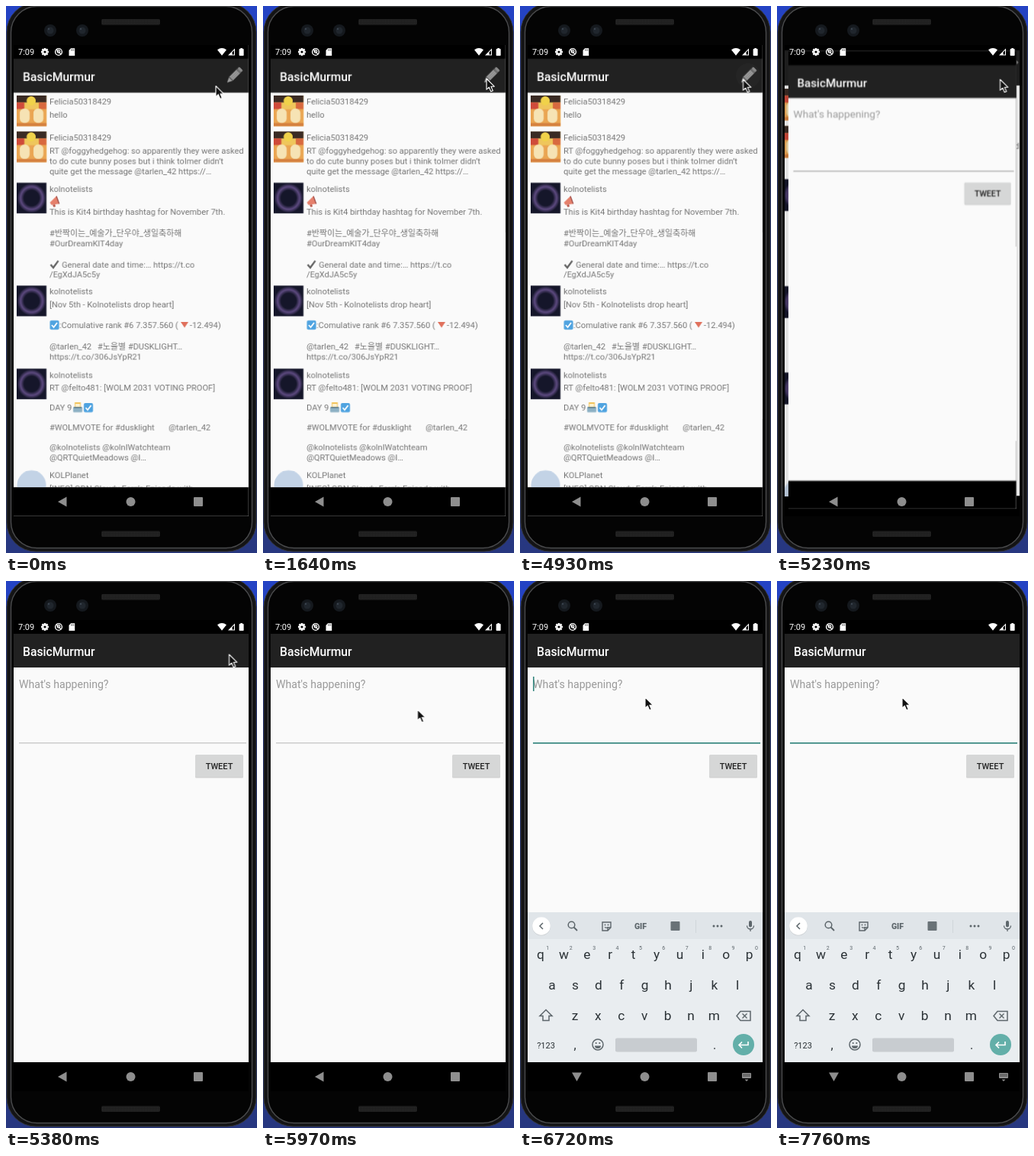
An HTML page for the animation above (8000 ms loop, 329x715 px).

```html
<!DOCTYPE html>
<html lang="en">
<head>
<meta charset="utf-8">
<style>
  html, body { margin: 0; width: 100%; height: 100%; overflow: hidden; background: #2440b8; }
  svg { display: block; width: 329px; height: 715px; }
  text { font-family: Roboto, 'Noto Sans CJK KR', 'Noto Sans CJK JP', sans-serif; white-space: pre; }
</style>
</head>
<body>
<script>
const LOOP = 8000;
const GREY = '#757575';

const rect = (x, y, w, h, fill, extra = '') =>
  `<rect x="${x}" y="${y}" width="${w}" height="${h}" fill="${fill}" ${extra}/>`;
const circle = (x, y, r, fill, extra = '') =>
  `<circle cx="${x}" cy="${y}" r="${r}" fill="${fill}" ${extra}/>`;
const path = (d, fill, extra = '') => `<path d="${d}" fill="${fill}" ${extra}/>`;
const line = (d, color, width = 1.5) => path(d, 'none', `stroke="${color}" stroke-width="${width}"`);
const text = (x, y, str, size = 11, fill = GREY, extra = '') =>
  `<text x="${x}" y="${y}" font-size="${size}" fill="${fill}" ${extra}>${str}</text>`;
const centered = (x, y, str, size, fill, extra = '') =>
  text(x, y, str, size, fill, `text-anchor="middle" ${extra}`);
const group = (content, attrs = '') => `<g ${attrs}>${content}</g>`;
const at = (x, y, content) => group(content, `transform="translate(${x} ${y})"`);

// Phone body
const speaker = y => rect(125, y, 77, 8, '#1b1b1b', 'rx="2"') + rect(126, y + 1, 75, 6, 'url(#mesh)');
const camera = x => circle(x, 32, 8, '#15191e') + circle(x, 32, 4.5, '#20262d') + circle(x - 2, 30, 1.2, '#3a424c');
const phone =
  rect(0, 0, 329, 715, 'url(#desk)') +
  rect(1, -4, 327, 717, '#141415', 'rx="38" stroke="#333436"') +
  rect(6.5, .5, 316, 708, '#040404', 'rx="34" stroke="#4a4b4d" stroke-width="1.4"') +
  camera(58) + camera(100) + speaker(17) + speaker(686);

// Status and navigation bars
const gearTeeth = [0, 45, 90, 135].map(a => rect(-1.2, -5, 2.4, 10, '#fff', `transform="rotate(${a})"`)).join('');
const status =
  text(16, 64, '7:09', 11, '#fff') +
  at(51, 60, gearTeeth + circle(0, 0, 3.7, '#fff') + circle(0, 0, 1.6, '#000')) +
  at(69, 60, circle(0, 0, 4.4, 'none', 'stroke="#fff" stroke-width="1.4"') +
    circle(0, -.6, 1.8, 'none', 'stroke="#fff" stroke-width="1.2"') + line('M-3 -3L3 3', '#fff', 1.1)) +
  path('M82.5 58L85 55.2H90.2V65H82.5Z', '#fff') + line('M85.6 56.5v2M87.2 56.5v2M88.8 56.5v2', '#000', .6) +
  path('M277 57.2Q283 52.8 289 57.2L283 64.8Z', '#fff') +
  path('M291 64.5L300 55.5V64.5Z', '#fff') + path('M296.5 60.5L299 58V63.5H296.5Z', '#000') +
  rect(305.6, 56, 6, 9, '#fff', 'rx=".8"') + rect(307.3, 55, 2.6, 2, '#fff');

const keyboardGlyph = rect(291, 643, 12, 7, '#8e8e8e', 'rx="1"') +
  [645, 647].map(y => line(`M292.5 ${y}h9`, '#000', 1.1).replace('/>', ' stroke-dasharray="1 1"/>')).join('') +
  path('M294.5 651.5h5l-2.5 2.5Z', '#8e8e8e');
const nav =
  circle(163.5, 648, 6, '#8e8e8e') + rect(246, 642, 12, 12, '#8e8e8e', 'rx="1"') +
  group(path('M68 648L79.5 641.5V654.5Z', '#8e8e8e'), 'id="back"') +
  group(path('M68 642.5H81L74.5 654Z', '#8e8e8e') + keyboardGlyph, 'id="hide"');

const appBar = rect(10, 51, 308, 18, '#000') + rect(10, 69, 308, 44, '#212121') +
  text(22, 98, 'BasicMurmur', 15.7, '#fff', 'font-weight="500"');

// Timeline
const photo = y => at(14, y,
  rect(0, 0, 39, 40, '#efc65c') + rect(0, 0, 39, 9, '#3a2b24') + circle(19, 7, 6, '#f0d24a') +
  rect(0, 9, 10, 9, '#cf4a3a') + rect(29, 9, 10, 9, '#d8693f') + rect(0, 18, 39, 22, '#eaa552') +
  rect(4, 17, 13, 19, '#f6e3b4', 'rx="6"') + rect(22, 17, 13, 19, '#f6e3b4', 'rx="6"') +
  rect(0, 36, 39, 4, '#d5803f'));
const badge = y => rect(14, y, 39, 40, 'url(#glow)');

const checkBox = (x, y) => at(x, y, rect(0, 0, 12, 12, '#4fa3e0', 'rx="2"') + line('M2.5 6L5 9L9.5 3', '#fff', 1.7));
const ballot = at(87, 518, rect(1, 6, 12, 7, '#8db1c4', 'rx="1"') + rect(3, 0, 8, 7, '#f1c35a') +
  rect(4, 2, 6, 4, '#fff3d2') + rect(2, 6, 10, 1.5, '#55788c'));
const megaphone = path('M57.5 257L66 248.5L69.5 258.5L59.5 260Z', '#e5806c') +
  path('M61 260l1.5 3l2.5-.8l-.8-2.8Z', '#b9574a') + line('M66 248.5L69.7 258.5', '#9c4a45', 1.3);

const posts = [
  [57, 129, 'Felicia50318429'], [57, 146, 'hello'],
  [57, 176, 'Felicia50318429'],
  [57, 193, 'RT @foggyhedgehog: so apparently they were asked'],
  [57, 206.5, 'to do cute bunny poses but i think tolmer didn’t'],
  [57, 219.5, 'quite get the message @tarlen_42 https://…'],
  [57, 243, 'kolnotelists'],
  [57, 272.5, 'This is Kit4 birthday hashtag for November 7th.'],
  [57, 301, '#반짝이는_예술가_단우야_생일축하해'],
  [57, 314.5, '#OurDreamKIT4day'],
  [73, 342, 'General date and time:… https://t.co'],
  [57, 355, '/EgXdJA5c5y'],
  [57, 377, 'kolnotelists'],
  [57, 394, '[Nov 5th - Kolnotelists drop heart]'],
  [70, 420.5, ':Comulative rank #6 7.357.560 ('], [241, 420.5, '-12.494)'],
  [57, 448.5, '@tarlen_42'], [120, 448.5, '#노을별 #DUSKLIGHT…'],
  [57, 462, 'https://t.co/306JsYpR21'],
  [57, 486, 'kolnotelists'],
  [57, 502.5, 'RT @felto481: [WOLM 2031 VOTING PROOF]'],
  [57, 529, 'DAY 9'],
  [57, 555, '#WOLMVOTE for #dusklight'], [213, 555, '@tarlen_42'],
  [57, 581, '@kolnotelists @kolnlWatchteam'],
  [57, 594, '@QRTQuietMeadows @I…'],
  [57, 617.5, 'KOLPlanet'],
  [57, 634, '[INFO] QDN Cloudy Fern’s Episode with']
];

const pencil = group(
  path('M-3.4 -9.5V6L0 13L3.4 6V-9.5Z', '#9d9d9d') + rect(-3.4, -13, 6.8, 3.6, '#8a8a8a', 'rx="1.2"') +
  line('M-3.4 -8.2H3.4M-3.4 6H3.4', '#3a3a3a', 1) + line('M-1 -8V6M1.4 -8V6', '#777', .6),
  'transform="translate(299 91) rotate(45)"');

const feed = group(
  rect(10, 51, 308, 616, '#000') + rect(10, 113, 308, 516, '#fafafa') + appBar +
  circle(299, 91, 16, '#fff', 'id="ripple" opacity="0"') + pencil +
  group(
    photo(117) + photo(164) + badge(231) + badge(365.5) + badge(474) + circle(33.5, 626, 19, '#c3d3e6') +
    megaphone + line('M58.5 338L62 342L68.5 333', '#666', 2.4) + checkBox(57.5, 411) +
    path('M229 413h10l-5 7.5Z', '#e0705c') + ballot + checkBox(102, 519) +
    posts.map(p => text(...p)).join(''),
    'clip-path="url(#listArea)"'),
  'id="feed"');

// Compose screen
const compose = group(
  rect(10, 51, 308, 616, '#000') + rect(10, 113, 308, 516, '#fafafa') + appBar +
  rect(10, 113, 308, 2, '#000', 'opacity=".06"') +
  text(17, 140, 'What\'s happening?', 14.1, '#9a9a9a') +
  rect(17, 211.3, 298, 1, '#8c8c8c', 'id="rule"') +
  rect(17, 211, 298, 1.7, '#35877f', 'id="focus"') +
  rect(17, 125, 1.6, 19, '#35877f', 'id="caret"') +
  rect(248, 228, 63, 29.5, '#000', 'rx="1.5" opacity=".16"') + rect(248, 227, 63, 29, '#d6d7d7', 'rx="1.5"') +
  centered(279.5, 246, 'TWEET', 11, '#222', 'font-weight="500"'),
  'id="compose"');

// Keyboard
const INK = '#2b3236', ICON = '#5d666b', PITCH = 30.4;
const keyRow = (keys, x, y) => [...keys].map((k, i) => centered(x + i * PITCH, y, k, 17.3, INK)).join('');
const keyboard = group(
  rect(10, 433, 308, 35, '#e0e5e9') + rect(10, 468, 308, 161, '#e9edf0') +
  circle(28, 451.5, 12, '#000', 'opacity=".1"') + circle(28, 451, 11.8, '#fff') +
  line('M30 447L26 451L30 455', ICON) +
  circle(67.5, 449.5, 4.3, 'none', `stroke="${ICON}" stroke-width="1.5"`) + line('M70.5 452.5L75 457', ICON, 1.8) +
  path('M108 446h11v7l-4 4h-7ZM115 457v-4h4', 'none', `stroke="${ICON}" stroke-width="1.4"`) +
  circle(111.5, 449.5, .9, ICON) + circle(115.5, 449.5, .9, ICON) + line('M111 452.5q2.4 1.8 4.5 0', ICON, 1.1) +
  centered(158, 454.5, 'GIF', 10.5, ICON, 'font-weight="900"') +
  rect(197.5, 445, 12, 12, '#697277', 'rx="1"') +
  rect(230, 443, 1, 17, '#d0d6da') +
  [254, 259, 264].map(x => circle(x, 451, 1.5, ICON)).join('') +
  rect(300, 444, 4, 8.5, ICON, 'rx="2"') + line('M297.5 450.5a4.5 4.5 0 0 0 9 0M302 455v3', ICON, 1.3) +
  keyRow('qwertyuiop', 27, 494) +
  [...'1234567890'].map((n, i) => centered(36.3 + i * PITCH, 481.5, n, 7, ICON)).join('') +
  keyRow('asdfghjkl', 42, 533.5) + keyRow('zxcvbnm', 72, 573.5) +
  path('M34 560.5L42 568.5H38V574.5H30V568.5H26Z', 'none', `stroke="${ICON}" stroke-width="1.5"`) +
  path('M289 562.5H302V574.5H289L284 568.5Z', 'none', `stroke="${ICON}" stroke-width="1.5"`) +
  line('M291.5 565.5l6 6M297.5 565.5l-6 6', ICON, 1.4) +
  centered(34, 610.5, '?123', 11, INK) + centered(72, 612, ',', 16, INK) + centered(255, 612, '.', 16, INK) +
  circle(102, 606, 7, 'none', `stroke="${ICON}" stroke-width="1.5"`) +
  circle(99.7, 604, 1.1, ICON) + circle(104.3, 604, 1.1, ICON) + path('M98 607.5h8a4 3.5 0 0 1-8 0Z', ICON) +
  rect(125, 597.5, 107, 18, '#c8ccd0', 'rx="2"') +
  circle(293, 606, 14, '#63afa9') + line('M299 602V606.5H287.5M291 602.5L287 606.5L291 610.5', '#fff', 1.6),
  'id="keyboard"');

const pointer = group(
  path('M0 0V14.2L3.3 11.2L5.7 16.8L8.3 15.7L5.9 10.2H10.2Z', '#111', 'stroke="#fff" stroke-width="1.1" stroke-linejoin="round"'),
  'id="pointer"');

const defs = `<defs>
  <linearGradient id="desk" x2="0" y2="1"><stop stop-color="#2443c4"/><stop offset="1" stop-color="#27377f"/></linearGradient>
  <radialGradient id="glow" r=".56"><stop offset=".45" stop-color="#15162a"/><stop offset=".66" stop-color="#5d4a80"/>
    <stop offset=".86" stop-color="#15162a"/></radialGradient>
  <pattern id="mesh" width="2" height="2" patternUnits="userSpaceOnUse">${rect(0, 0, 1, 1, '#333')}</pattern>
  <clipPath id="screen">${rect(10, 51, 308, 616, '#000')}</clipPath>
  <clipPath id="app">${rect(10, 51, 308, 578, '#000')}</clipPath>
  <clipPath id="listArea">${rect(10, 113, 308, 516, '#000')}</clipPath>
</defs>`;

document.body.innerHTML = `<svg viewBox="0 0 329 715">${defs}${phone}
  ${group(feed + compose, 'clip-path="url(#screen)"')}
  ${group(keyboard, 'clip-path="url(#app)"')}${status}${nav}${pointer}</svg>`;

// Each table row is [time in ms, value]; a value holds until the next row.
function play(id, property, rows) {
  const frames = rows.map(([time, value]) => ({ offset: time / LOOP, [property]: value, easing: 'steps(1, end)' }));
  frames.push({ offset: 1, [property]: rows.at(-1)[1] });
  document.getElementById(id).animate(frames, { duration: LOOP, iterations: Infinity });
}
const moves = rows => rows.map(([time, x, y]) => [time, `translate(${x}px, ${y}px)`]);
const zoom = s => `translate(164px, 348px) scale(${s}) translate(-164px, -348px)`;

play('pointer', 'transform', moves([
  [0, 275, 104.5], [150, 284, 96], [290, 288.5, 90.5],
  [1490, 290, 92], [1640, 293, 95], [1790, 296, 98], [1940, 298, 99],
  [2990, 295, 98], [3140, 292.5, 96],
  [5530, 286, 104], [5680, 266, 124], [5820, 232, 150], [5970, 202.5, 168],
  [6120, 178, 160], [6270, 164, 152]
]));
play('ripple', 'opacity', [[0, 0], [4640, .05], [4790, .08], [4930, .02], [5230, 0]]);
play('feed', 'transform', [[0, zoom(1)], [5230, zoom(1.04)], [5380, zoom(1)]]);
play('feed', 'opacity', [[0, 1], [5230, .92]]);
play('compose', 'transform', [[0, zoom(1)], [5230, zoom(.97)], [5380, zoom(1)]]);
play('compose', 'opacity', [[0, 0], [5230, 1]]);
play('rule', 'opacity', [[0, 1], [5380, .6], [6420, 0]]);
play('focus', 'opacity', [[0, 0], [6420, 1]]);
play('caret', 'opacity', [[0, 0], [6420, 1], [6870, 0], [7320, 1], [7760, 0]]);
play('keyboard', 'transform', moves([[0, 0, 200], [6570, 0, 45], [6720, 0, 0]]));
play('back', 'opacity', [[0, 1], [6570, 0]]);
play('hide', 'opacity', [[0, 0], [6570, 1]]);
</script>
</body>
</html>
```
